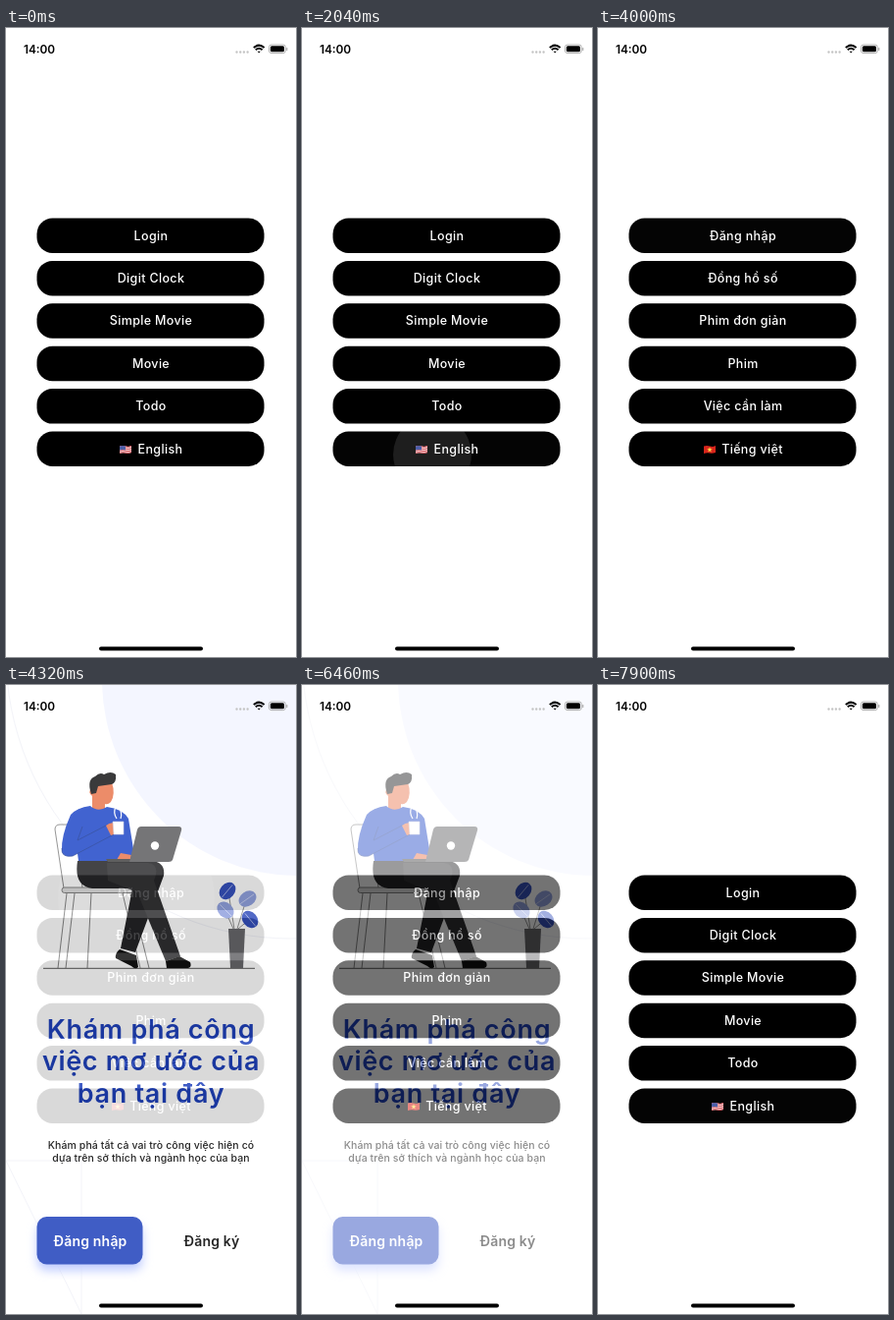
Recreate the animation shown at these times as an HTML page. Size 296 px wide and 640 px high, loop 8 s.

```html
<!DOCTYPE html>
<html lang="vi">
<head>
<meta charset="utf-8">
<title>App menu</title>
<style>
  html, body { margin: 0; width: 100%; height: 100%; overflow: hidden; background: #fff; }
  svg { display: block; font-family: Inter, Roboto, sans-serif; }
  text { text-anchor: middle; }
  .menu text { font-size: 12.5px; font-weight: 500; letter-spacing: .35px; fill: #fff; }
  .title { font-size: 27px; font-weight: 600; letter-spacing: .7px; fill: #1f41bb; }
  .lead { font-size: 10.5px; font-weight: 500; letter-spacing: .1px; }
  .action { font-size: 14px; font-weight: 600; letter-spacing: .2px; }
  .clock { font-size: 11.8px; font-weight: 600; }
</style>
</head>
<body>
<svg width="296" height="640" viewBox="0 0 296 640">
  <defs>
    <clipPath id="pill"><rect x="31.5" width="232" height="35.5" rx="16"/></clipPath>
    <filter id="soft" x="-20%" y="-40%" width="140%" height="200%"><feGaussianBlur stdDeviation="5"/></filter>
    <g id="us">
      <path fill="#f5e9e9" d="M0 1Q3 0 6 1T12 .5V7.5Q9 8.5 6 8T0 8.5Z"/>
      <path fill="none" stroke="#d8464f" d="M0 1.5Q3 .5 6 1.5T12 1M0 3.6Q3 2.6 6 3.6T12 3.1M0 5.7Q3 4.7 6 5.7T12 5.2M0 7.8Q3 6.8 6 7.6T12 7.1"/>
      <path fill="#4d5fa8" d="M0 1Q3 0 6 1V5Q3 4 0 5Z"/>
    </g>
    <g id="vn">
      <path fill="#d9251c" d="M0 1Q3 0 6 1T12 .5V7.5Q9 8.5 6 8T0 8.5Z"/>
      <path fill="#ffe04a" d="M6 1.7 6.7 3.7H8.8L7.1 5 7.7 7 6 5.8 4.3 7 4.9 5 3.2 3.7H5.3Z"/>
    </g>
  </defs>

  <g class="menu" id="menu"></g>

  <g id="page">
    <rect width="296" height="640" fill="#fff"/>
    <circle cx="298" cy="-6" r="200" fill="#f3f5ff"/>
    <g fill="none" stroke="#f1f2f8">
      <circle cx="290" cy="-32" r="290"/>
      <path d="M0 484H77V640M0 484 77 640"/>
    </g>

    <g fill="#fff" stroke="#777" stroke-width=".9">
      <path d="M59 207 50 147Q50 142 55 142H72L78 207M62 212 53 288M70 212 61 288M87 212 83 288M119 212 137 288M127 212 146 288" fill="none"/>
      <rect x="57" y="206" width="74" height="5.5" rx="2.7" fill="#ddd"/>
    </g>
    <path d="M38 288.3H254" stroke="#555"/>

    <path fill="#242426" d="M73 179H148Q163 180 161 194L132 272 117 268 129 207H88Q69 205 73 179Z"/>
    <path fill="#303032" d="M103 181H145Q158 183 151 199L178 276 163 281 134 211 104 199Z"/>
    <path fill="#111" d="M116 269 133 275 135 287Q132 290 128 286L112 278Q111 273 116 269ZM163 281 177 276 188 282Q190 287 186 288H164Z"/>
    <path fill="#e97850" d="M90 102 108 99Q112 111 107 119 104 122 101 121V129H88V113Q83 109 87 106Z"/>
    <path fill="#18181a" d="M87 111Q82 96 91 93 96 88 100 91 107 87 112 91 113 99 108 101L94 103 92 110Z"/>
    <path fill="#2148c8" d="M86 123Q94 130 103 124 119 126 125 136L132 179H74L72 164 57 169Q56 154 66 132 72 125 86 123Z"/>
    <path fill="#2148c8" stroke="#17368f" stroke-width=".7" d="M78 144 73 158 104 142 110 152 68 174Q56 176 57 166"/>
    <path fill="#e97850" d="M102 143Q108 138 114 142L113 151 107 153Z"/>
    <path fill="#fff" stroke="#ccd" stroke-width=".6" d="M109 139H120V152H110Z"/>
    <path fill="none" stroke="#fff" stroke-width="1.2" d="M113 136Q109 130 112 124M117 136Q119 130 115 124"/>
    <path fill="#e97850" d="M117 171 128 173 127 178H113Z"/>
    <path fill="#444" d="M102 177H150V180H104Z"/>
    <path fill="#5d5d60" d="M138 144H176Q180 144 179 148L170 178Q169 180 166 180H126L134 147Q135 144 138 144Z"/>
    <circle cx="152" cy="163.5" r="4.2" fill="#fff"/>

    <path fill="none" stroke="#777" stroke-width=".8" d="M233 248 227 211M236 248 245 219M232 248 224 230M237 248 248 239"/>
    <g id="leaves"></g>
    <path fill="#68686c" d="M227 248H244L242 288H229Z"/>

    <text class="title" x="148" y="360">Khám phá công</text>
    <text class="title" x="148" y="392">việc mơ ước của</text>
    <text class="title" x="148" y="424.5">bạn tại đây</text>
    <text class="lead" x="148" y="472">Khám phá tất cả vai trò công việc hiện có</text>
    <text class="lead" x="148" y="485">dựa trên sở thích và ngành học của bạn</text>

    <rect x="31.5" y="548" width="108" height="48" rx="10" fill="#b9c7ff" filter="url(#soft)"/>
    <rect x="31.5" y="541" width="108" height="48.5" rx="10" fill="#1f41bb"/>
    <text class="action" x="86" y="570.5" fill="#fff">Đăng nhập</text>
    <text class="action" x="210" y="570.5">Đăng ký</text>
  </g>

  <text class="clock" x="34" y="25.7">14:00</text>
  <path d="M235.5 24.5H248" stroke="#c4c4c4" stroke-width="2.4" stroke-linecap="round" stroke-dasharray="0 3.7"/>
  <g fill="none" stroke="#000" stroke-width="2">
    <path d="M252.8 20Q258.2 15.3 263.6 20M254.8 22.2Q258.2 19.4 261.6 22.2"/>
    <path d="M256.6 23.8H259.8L258.2 25.6Z" fill="#000" stroke="none"/>
  </g>
  <rect x="268.4" y="17" width="17" height="8.6" rx="2.6" fill="none" stroke="#aaa" stroke-width=".9"/>
  <rect x="269.8" y="18.3" width="14.2" height="6" rx="1.5"/>
  <path d="M286.8 20V23" stroke="#aaa" stroke-width="1.1"/>
  <rect x="95" y="629.6" width="106" height="4" rx="2"/>
</svg>
<script>
const $ = id => document.getElementById(id);
const LOOP = 8000, STEP = 108;
const labels = {
  us: ['Login', 'Digit Clock', 'Simple Movie', 'Movie', 'Todo', 'English'],
  vn: ['Đăng nhập', 'Đồng hồ số', 'Phim đơn giản', 'Phim', 'Việc cần làm', 'Tiếng việt']
};
// start, button, ripple phase at the first step
const taps = [[500, 5, 0], [2040, 5, 1], [2850, 5, 0], [4000, 0, 0], [7050, 5, 0], [7900, 5, 0]];
const switches = [500, 2040, 2850, 7050];

$('menu').innerHTML = labels.us.map((_, i) => `
  <g transform="translate(0 ${193.5 + i * 43.4})">
    <rect x="31.5" width="232" height="35.5" rx="16"/>
    <g clip-path="url(#pill)" fill="#fff">
      <rect class="glow" x="31" width="233" height="36"/>
      <circle class="ripple" cx="133" cy="23.5"/>
    </g>
    <text x="${i == 5 ? 157.5 : 148}" y="22.2"></text>
  </g>`).join('') + '<use id="flag"/>';
const rows = [...$('menu').querySelectorAll('g[transform]')].map(g => ({
  text: g.querySelector('text'), glow: g.querySelector('.glow'), ripple: g.querySelector('.ripple')
}));

$('leaves').innerHTML = [
  [226, 209.5, 40, '#3651bd'], [246.5, 217.5, 55, '#92a2df'],
  [224, 229, -45, '#92a2df'], [249, 238.5, -40, '#3651bd']
].map(([x, y, turn, fill]) => `
  <g transform="translate(${x} ${y}) rotate(${turn})">
    <ellipse rx="7.4" ry="9.6" fill="${fill}"/>
    <path d="M0-8V9" stroke="#dfe4fa" stroke-width=".6"/>
  </g>`).join('');

function setLanguage(lang) {
  labels[lang].forEach((label, i) => rows[i].text.textContent = label);
  $('flag').setAttribute('href', '#' + lang);
  $('flag').setAttribute('transform', `translate(${lang == 'us' ? 116 : 108} 424.5)`);
}

function setRipple(row, phase) {
  const on = phase >= 0;
  row.glow.setAttribute('opacity', on ? .015 : 0);
  row.ripple.setAttribute('r', on ? 40 * phase : 0);
  row.ripple.setAttribute('opacity', on ? .13 - .03 * phase : 0);
}

function pageOpacity(t) {
  const shown = Math.floor((t - 4000) / STEP), hidden = Math.floor((t - 6350) / STEP);
  if (shown < 1 || hidden > 1) return 0;
  if (hidden == 1) return .45;
  return [0, .4, .85][shown] ?? 1;
}

let language;
function draw(now) {
  const t = now % LOOP;
  const lang = switches.filter(s => t >= s).length % 2 ? 'vn' : 'us';
  if (lang != language) setLanguage(language = lang);
  rows.forEach(row => setRipple(row, -1));
  for (const [start, i, phase] of taps) {
    const step = Math.floor((t - start) / STEP);
    if (step >= 0 && step < 3) setRipple(rows[i], step + phase);
  }
  $('page').setAttribute('opacity', pageOpacity(t));
  requestAnimationFrame(draw);
}
draw(performance.now());
</script>
</body>
</html>
```
